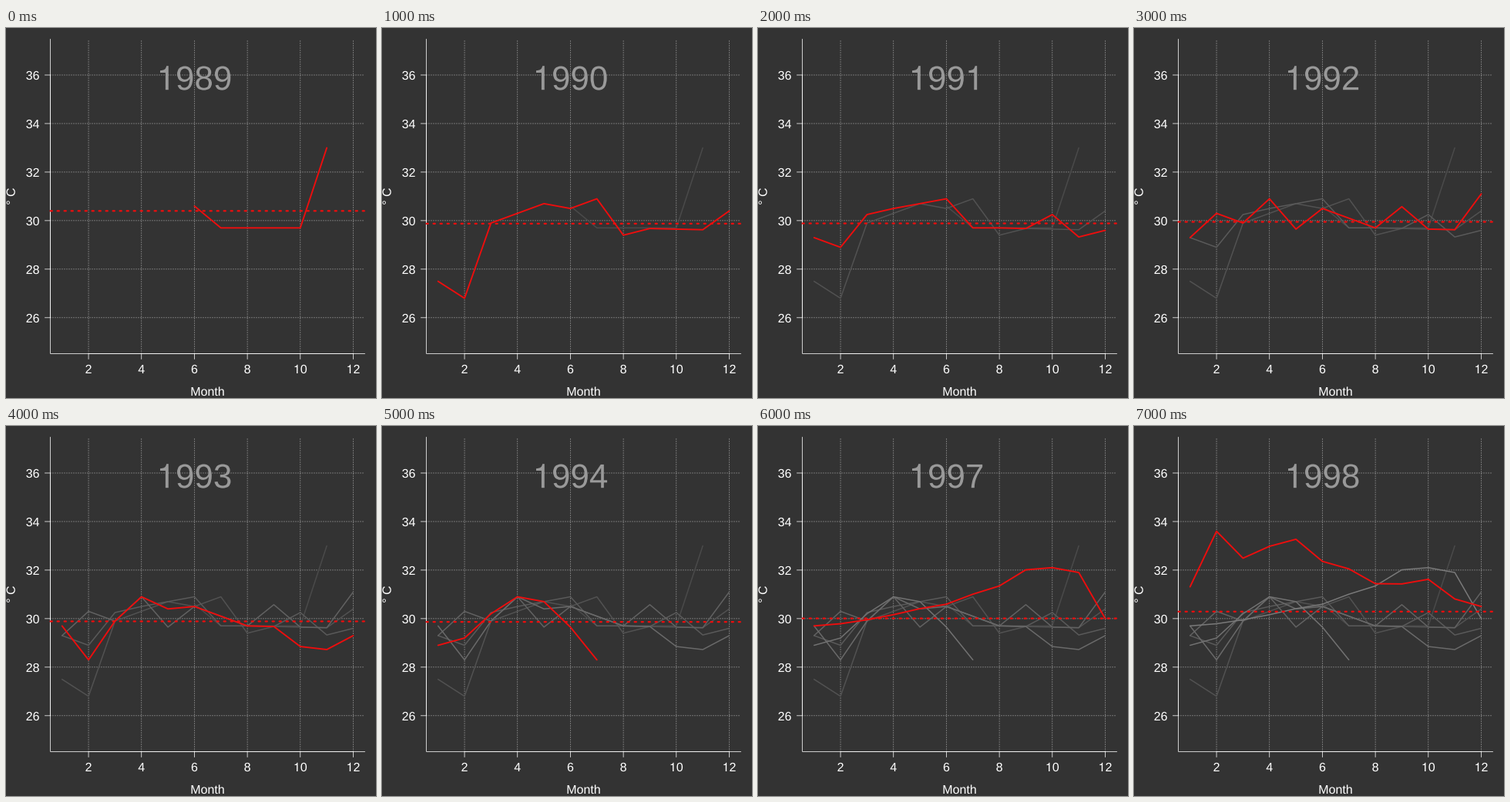
A matplotlib script for the animation above (8 s loop, 480 by 480 pixels).

```python
import numpy as np
import matplotlib.pyplot as plt
from matplotlib.animation import FuncAnimation
from matplotlib.patches import PathPatch
from matplotlib.path import Path
from matplotlib.textpath import TextPath

SIZE, DPI = 480, 72          # at 72 dpi one point is one pixel
LEFT, TOP, RIGHT, BOTTOM = 57.6, 14.4, 465.6, 422.4
BACK, GRID, RED = "#333333", "#bebebe", "#ee0d0d"
FONT = {"family": "Liberation Sans"}
DIGIT = 0.556                # advance of a digit in em


def season(m):
    """A usual year: cool February, warm April, level autumn."""
    return np.interp(m, [1, 2, 4, 6, 8, 12], [29.3, 28.9, 30.9, 30.5, 29.7, 29.6])


def flat(m):
    return 29.7


def warming(m):
    return 29.7 + 2.4 * ((min(m, 10) - 1) / 9) ** 1.5


def cooling(m):
    return 33.6 - 0.31 * (m - 2)


# year, trend, first and last month, months that stray from the trend
YEARS = [
    (1989, flat, 6, 11, {6: .9, 11: 3.3}),
    (1990, season, 1, 12, {1: -1.8, 2: -2.1, 4: -.6, 7: .8, 8: -.3, 12: .8}),
    (1991, season, 1, 12, {3: .35, 4: -.4, 6: .4, 7: -.4, 10: .6, 11: -.3}),
    (1992, season, 1, 12, {2: 1.4, 5: -1.05, 9: .9, 12: 1.5}),
    (1993, season, 1, 12, {1: .4, 2: -.6, 5: -.3, 10: -.8, 11: -.9, 12: -.3}),
    (1994, season, 1, 7, {1: -.4, 2: .3, 3: .3, 6: -.85, 7: -1.8}),
    (1997, warming, 1, 12, {6: -.1, 9: .3, 11: -.2, 12: -2.1}),
    (1998, cooling, 1, 12, {1: -2.6, 3: -.8, 5: .6, 8: -.3, 10: .5}),
]

fig = plt.figure(figsize=(SIZE / DPI, SIZE / DPI), dpi=DPI, facecolor=BACK)
ax = fig.add_axes([0, 0, 1, 1])


def px(month):
    return LEFT + (month - 0.56) / 11.88 * (RIGHT - LEFT)


def py(temp):
    return TOP + (37.48 - temp) / 12.96 * (BOTTOM - TOP)


def readings(k):
    _, trend, first, last, strays = YEARS[k]
    months = range(first, last + 1)
    return months, [trend(m) + strays.get(m, 0) for m in months]


def stroke(xs, ys, color, width, dotted=False, z=1):
    ax.plot(xs, ys, color=color, lw=width, zorder=z, snap=False,
            ls=(0, (1, 3)) if dotted else "-",
            dash_capstyle="round", solid_capstyle="round",
            solid_joinstyle="round")


def glyphs(path, x, y, color, upright=False):
    """Place an outline with y pointing up; upright turns it a quarter left."""
    u, v = path.vertices.T
    verts = np.column_stack([x - v, y - u] if upright else [x + u, y - v])
    ax.add_patch(PathPatch(Path(verts, path.codes), fc=color, lw=0, zorder=4))


def one(size):
    """A numeral one without a foot."""
    pts = [(.259, .505), (.259, 0), (.347, 0), (.347, .705), (.289, .705),
           (.258, .600), (.238, .585), (.102, .568), (.102, .505), (.259, .505)]
    codes = [Path.MOVETO] + [Path.LINETO] * 4 + [Path.CURVE4] * 3
    codes += [Path.LINETO, Path.CLOSEPOLY]
    return Path(np.array(pts) * size, codes)


def number(cx, y, value, size, color):
    """Digits centred on cx with their baseline at y."""
    text = str(value)
    x = cx - len(text) * DIGIT * size / 2
    for ch in text:
        path = one(size) if ch == "1" else TextPath((0, 0), ch, size=size, prop=FONT)
        glyphs(path, x, y, color)
        x += DIGIT * size


def title(x, y, text, upright=False):
    path = TextPath((0, 0), text, size=16, prop=FONT)
    box = path.get_extents()
    half = (box.x0 + box.x1) / 2
    if upright:
        glyphs(path, x, y + half, "white", True)
    else:
        glyphs(path, x - half, y, "white")


def draw_axes():
    for month in range(2, 13, 2):
        x = px(month)
        stroke([x, x], [BOTTOM, TOP], GRID, 0.75, dotted=True)
        stroke([x, x], [BOTTOM, BOTTOM + 7.2], "white", 0.75, z=2)
        number(x, 448, month, 16, "white")
    for temp in range(26, 37, 2):
        y = py(temp)
        stroke([LEFT, RIGHT], [y, y], GRID, 0.75, dotted=True)
        stroke([LEFT - 7.2, LEFT], [y, y], "white", 0.75, z=2)
        number(34.6, round(y) + 6, temp, 16, "white")
    # frame, then the axis lines over it between the outer ticks
    stroke([LEFT, LEFT, RIGHT], [TOP, BOTTOM, BOTTOM], "white", 0.75, z=2)
    stroke([px(2), px(12)], [BOTTOM, BOTTOM], "white", 0.75, z=2)
    stroke([LEFT, LEFT], [py(36), py(26)], "white", 0.75, z=2)
    title(261.6, 477, "Month")
    title(11.7, 218.4, "° C", upright=True)


def draw_year(k, color, width, z):
    months, temps = readings(k)
    stroke([px(m) for m in months], [py(t) for t in temps], color, width, z=z)


def draw(i):
    ax.clear()
    ax.set(xlim=(0, SIZE), ylim=(SIZE, 0))
    ax.axis("off")
    draw_axes()
    number(px(6), 80.2, YEARS[i][0], 44, "#999999")

    for k in range(i):
        draw_year(k, str((74 + 8 * k) / 255), 1.5, 3)
    draw_year(i, RED, 1.9, 5)

    # mean of everything up to the current year
    seen = [t for k in range(i + 1) for t in readings(k)[1]]
    y = py(np.mean(seen))
    stroke([LEFT, RIGHT], [y, y], RED, 2.25, dotted=True, z=5)
    return []


anim = FuncAnimation(fig, draw, frames=len(YEARS), interval=1000,
                     repeat=True, repeat_delay=0)
plt.show()
```
